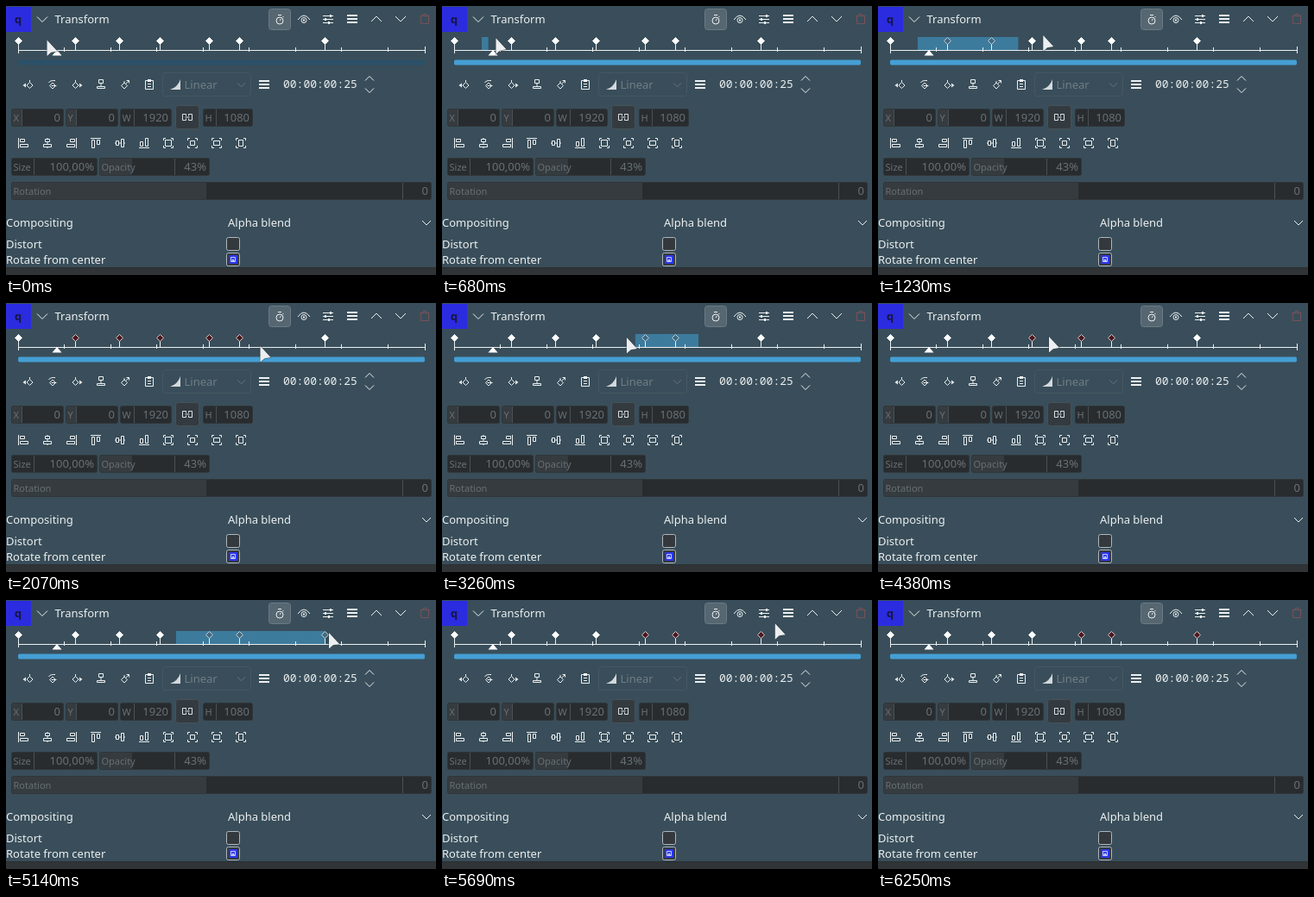
These frames come from a looping animation (498 px wide and 312 px high, 6.32 s). An HTML page with a canvas:

```html
<!DOCTYPE html>
<html lang="en">
<head>
<meta charset="utf-8">
<title>Keyframe selection</title>
<style>
html, body { margin: 0; width: 100%; height: 100%; overflow: hidden; background: #394e5a; }
canvas { display: block; }
</style>
</head>
<body>
<canvas id="stage" width="498" height="312"></canvas>
<script>
const ctx = document.getElementById('stage').getContext('2d');
const LOOP = 6320;
const SANS = '"Noto Sans", sans-serif';
const INK = '#eceff0', DIM = '#687075', FIELD = '#282c2f', LABEL = '#353b3f', SPLIT = '#485057';
const KEYS = [14, 80, 131, 178, 235, 270, 369];

// Pointer waypoints: time, x, y
const PATH = [
  [0, 47.5, 39.5], [130, 47.5, 39.5], [410, 46, 38], [550, 46, 38],
  [900, 90, 36], [1160, 162, 34], [1230, 191, 34], [1500, 270, 37],
  [1800, 290, 44], [2070, 294.5, 50], [2490, 297, 42], [2700, 297, 41],
  [3190, 224, 40], [3260, 214, 40], [3700, 166, 39], [4030, 172, 39],
  [4380, 198, 39], [4720, 197, 39], [4790, 197, 39], [5070, 370, 38],
  [5140, 374, 38], [5410, 381, 38], [5620, 384, 36], [6100, 396, -24],
  [6320, 396, -24]
];

// Rubber-band drags: press time, release time, anchor
const DRAGS = [
  { from: 550, to: 1860, x: 46 },
  { from: 2700, to: 3960, x: 297 },
  { from: 4790, to: 5480, x: 197 }
];

function pointer(t) {
  let i = 1;
  while (i < PATH.length - 1 && PATH[i][0] < t) i++;
  const [t0, x0, y0] = PATH[i - 1], [t1, x1, y1] = PATH[i];
  const k = Math.min(1, Math.max(0, (t - t0) / (t1 - t0)));
  return [x0 + (x1 - x0) * k, y0 + (y1 - y0) * k];
}

function rect(x, y, w, h, color) {
  ctx.fillStyle = color;
  ctx.fillRect(x, y, w, h);
}

function box(x, y, w, h, fill, line, r = 2) {
  ctx.beginPath();
  ctx.roundRect(x + .5, y + .5, w - 1, h - 1, r);
  if (fill) { ctx.fillStyle = fill; ctx.fill(); }
  if (line) { ctx.strokeStyle = line; ctx.lineWidth = 1; ctx.stroke(); }
}

function text(s, x, y, { size = 13, color = INK, align = 'left', family = SANS, weight = 400 } = {}) {
  ctx.font = `${weight} ${size}px ${family}`;
  ctx.fillStyle = color;
  ctx.textAlign = align;
  ctx.fillText(s, x, y);
}

// Icons are paths around their own centre; "solid" parts are filled
function icon(x, y, line, { solid = '', color = INK, flip = 1, turn = 0 } = {}) {
  ctx.save();
  ctx.translate(x, y);
  ctx.rotate(turn);
  ctx.scale(flip, 1);
  ctx.strokeStyle = ctx.fillStyle = color;
  ctx.lineWidth = 1;
  ctx.stroke(new Path2D(line));
  if (solid) ctx.fill(new Path2D(solid));
  ctx.restore();
}

const chevron = (x, y, dir, size = 6, color = INK) =>
  icon(x, y, `M${-size} ${-dir * size / 2}L0 ${dir * size / 2}L${size} ${-dir * size / 2}`, { color });

function menu(x, y) {
  for (const dy of [-5, -1, 3]) rect(x - 6, y + dy, 12, 2, INK);
}

function header() {
  rect(0, 1, 29, 29, '#2b2be0');
  text('q', 14, 20, { color: '#15153f', align: 'center', weight: 700, family: '"Noto Sans Mono", monospace' });
  chevron(42, 15.5, 1);
  text('Transform', 56.5, 20);
  box(304, 3, 26, 25, '#566772', '#6a7a84', 3);
  icon(317, 16, 'M4 1A4 4 0 1 1 -4 1A4 4 0 1 1 4 1M-2 -5.5H2M0 1L1.5 -1M3.5 -4L4.5 -3');
  icon(345, 15, 'M-7 1Q0 -9 7 1M3 1.5A3 3 0 1 1 -3 1.5A3 3 0 1 1 3 1.5', { solid: 'M-1 .5H1V2.5H-1Z' });
  icon(373, 15, 'M-6 -3.5H6M-6 .5H6M-6 4.5H6', { solid: 'M2 -5H4V-2H2ZM-4 -1H-2V2H-4ZM0 3H2V6H0Z' });
  menu(401, 15);
  chevron(429, 15, -1);
  chevron(457, 15, 1);
  icon(485, 15, 'M-5.5 -3.5H5.5M-2 -3.5V-5.5H2V-3.5M-4.5 -3.5V5.5H4.5V-3.5', { color: '#78505a' });
}

function keyTools() {
  const y = 91;
  const step = 'M1.5 -2.5L5 1L1.5 4.5L-2 1ZM1.5 -5V-2.5';
  const arrow = 'M-6.5 1L-3 -1.5V3.5Z';
  icon(26, y, step, { solid: arrow });
  icon(54, y, 'M0 -2L3.5 1.5L0 5L-3.5 1.5ZM-4.5 -2Q-3 -5 3 -4.5M-1.5 1.5H4.5');
  icon(82, y, step, { solid: arrow, flip: -1 });
  icon(110, y, 'M-2.5 -5.5H2.5V-1.5H-2.5ZM0 -1.5V2.5M-4.5 2.5H4.5V4.5H-4.5Z');
  icon(138, y, 'M-1 -2L2.5 1.5L-1 5L-4.5 1.5ZM-1 -4V-2M1.5 -4.5H4.5V-1.5M4.5 -4.5L0 0');
  icon(166, y, 'M-4.5 -4.5H4.5V5.5H-4.5ZM-2 -.5H2M-2 2.5H2', { solid: 'M-2 -6H2V-3H-2Z' });
  box(181, 77, 103, 28, null, '#465761', 3);
  icon(196, y, '', { solid: 'M-6 6H6V-6Q3 3 -6 6Z', color: '#d4d9dc' });
  text('Linear', 206.5, 96, { color: '#707d85' });
  chevron(272.5, 91.5, 1, 4.5, '#66747c');
  menu(299, y);
  text('00:00:00:25', 321, 95, { family: '"Noto Sans Mono", monospace' });
  chevron(421, 84, -1, 5);
  chevron(421, 98, 1, 5);
}

// A labelled value; "fill" is the width of the lighter level behind it
function field(x, y, w, label, value, split, fill = 0) {
  box(x, y, w, 21, FIELD, '#30363a');
  rect(x + 1, y + 1, fill, 19, LABEL);
  rect(x + split, y + 1, 1, 19, SPLIT);
  text(label, x + 2.5, y + 14.5, { size: 11, color: DIM });
  text(value, x + w - 4, y + 15, { color: DIM, align: 'right' });
}

function geometry() {
  field(6, 119, 61, 'X', '0', 12, 11);
  field(69, 119, 61, 'Y', '0', 12, 11);
  field(132, 119, 60, 'W', '1920', 16);
  field(228, 119, 58, 'H', '1080', 15);
  box(196, 115, 28, 28, '#343b40', '#485157', 3);
  icon(210, 129, 'M-1.5 -3.5H-5.5V3.5H-1.5M1.5 -3.5H5.5V3.5H1.5M-2.5 0H2.5M-1.5 -3.5V-1.5M1.5 -3.5V-1.5M-1.5 3.5V1.5M1.5 3.5V1.5', { color: '#dce0e2' });

  const edge = 'M-5.5 -6V6M-3.5 -4.5H1.5V-1.5H-3.5ZM-3.5 1.5H5.5V4.5H-3.5Z';
  const middle = 'M0 -6V-4.5M0 -1.5V1.5M0 4.5V6M-2.5 -4.5H2.5V-1.5H-2.5ZM-4.5 1.5H4.5V4.5H-4.5Z';
  const quarter = Math.PI / 2, y = 159;
  icon(20, y, edge);
  icon(48, y, middle);
  icon(76, y, edge, { flip: -1 });
  icon(104, y, edge, { turn: quarter });
  icon(132, y, middle, { turn: -quarter });
  icon(160, y, edge, { turn: -quarter });
  const corners = 'M-5.5 -3V-5.5H-3M3 -5.5H5.5V-3M5.5 3V5.5H3M-3 5.5H-5.5V3';
  const inner = ['M-3.5 -3.5H3.5V3.5H-3.5Z', 'M-2.5 -2.5H2.5V2.5H-2.5Z', 'M-3.5 -2.5H3.5V2.5H-3.5Z', 'M-2.5 -3.5H2.5V3.5H-2.5Z'];
  inner.forEach((d, i) => icon(188 + 28 * i, y, corners + d));

  field(6, 176, 100, 'Size', '100,00%', 26);
  field(108, 176, 128, 'Opacity', '43%', 87, 37);
  field(6, 204, 487, 'Rotation', '0', 453, 225);
}

function options() {
  text('Compositing', 0, 256);
  text('Alpha blend', 257, 256);
  chevron(487, 251.5, 1, 5);
  text('Distort', 0, 281);
  text('Rotate from center', 0, 299);
  for (const y of [268, 286]) box(255, y, 16, 16, '#34393d', '#aeb6ba');
  rect(258, 289, 10, 10, '#2b35e6');
  icon(263, 294, 'M-2.5 -2.5H2.5V2.5H-2.5Z', { color: '#c5cdf5', solid: 'M-2 2L0 -1L2 2Z' });
  rect(0, 303, 498, 9, '#303437');
  rect(0, 303, 498, 1, '#2a2f33');
}

function diamond(x, y, fill, line) {
  const p = new Path2D('M0 -4L4 0L0 4L-4 0Z');
  ctx.save();
  ctx.translate(x, y);
  ctx.fillStyle = fill;
  ctx.fill(p);
  ctx.strokeStyle = line;
  ctx.lineWidth = 1;
  ctx.stroke(p);
  ctx.restore();
}

function ruler(t) {
  const drag = DRAGS.filter(d => t >= d.from).pop();
  const active = drag && t < drag.to;
  let lo = 0, hi = 0;
  if (drag) {
    // The band trails the pointer by one refresh
    const end = pointer(Math.min(t, drag.to) - 70)[0];
    lo = Math.min(drag.x, end);
    hi = Math.max(drag.x, end);
  }
  if (active) rect(lo, 36, hi - lo, 15, '#3d7b9d');

  rect(14, 51, 472, 1, INK);
  for (let i = 1; i < 9; i++) rect(Math.floor(14 + i * 53.5), 48, 1, 5, INK);
  rect(14, 46, 1, 9, INK);
  rect(485, 47, 1, 8, INK);

  for (const x of KEYS) {
    rect(x, 44, 1, 7, INK);
    const picked = drag && x >= lo && x <= hi;
    const colors = !picked ? ['#fff', '#f4f6f7'] : active ? ['#416b83', '#c4cdd2'] : ['#4b1b20', '#dfc4c6'];
    diamond(x + .5, 40.5, ...colors);
  }

  box(14, 62.5, 471, 6, t < 130 ? '#2b5067' : '#459fd4', t < 130 ? '#2b5067' : '#459fd4', 1);
  icon(59, 51, '', { solid: 'M0 0L5.5 6.5H-5.5Z', color: '#fff' });
}

function arrow(x, y) {
  const p = new Path2D('M0 0V18.5L4.8 14.2L12 13Z');
  ctx.save();
  ctx.translate(x, y);
  ctx.lineJoin = 'round';
  ctx.strokeStyle = 'rgba(40,52,60,.45)';
  ctx.lineWidth = 1.5;
  ctx.stroke(p);
  ctx.fillStyle = '#eceeef';
  ctx.fill(p);
  ctx.restore();
}

function draw(now) {
  const t = now % LOOP;
  rect(0, 0, 498, 312, '#394e5a');
  header();
  keyTools();
  geometry();
  options();
  ruler(t);
  arrow(...pointer(t));
  requestAnimationFrame(draw);
}

draw(0);
</script>
</body>
</html>
```
